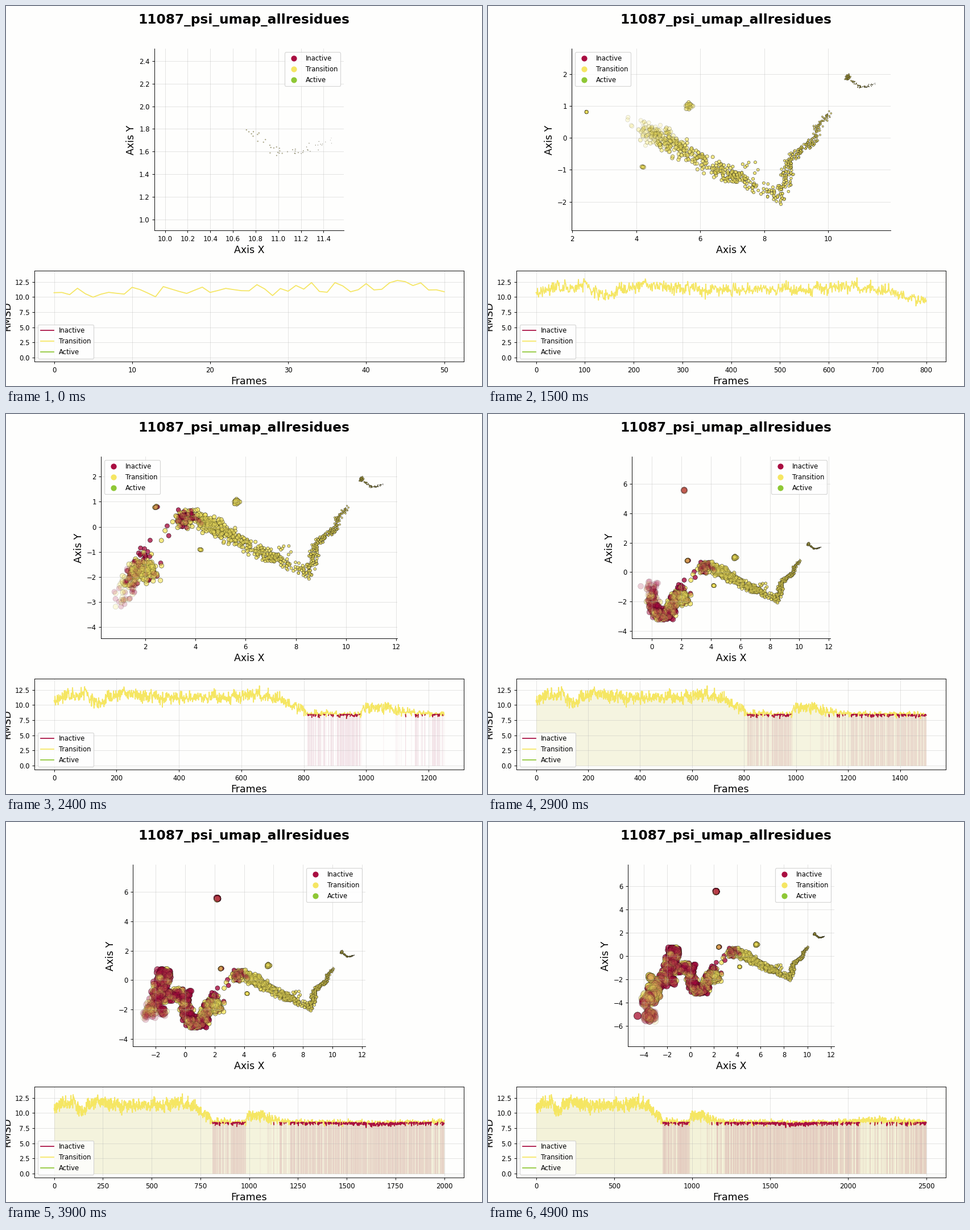
Write a matplotlib script that moves like this. It is 837x669 px and loops after 5000 ms.

```python
import numpy as np
import matplotlib.pyplot as plt
from matplotlib.animation import FuncAnimation
from matplotlib.colors import to_rgb
from matplotlib.lines import Line2D

WIDTH, HEIGHT, DPI = 837, 669, 83.7
STEP, STEPS = 50, 50
TOTAL = STEP * STEPS
RED, YELLOW, GREEN = "#a90e41", "#f5e663", "#8ec735"
STATES = {"Inactive": RED, "Transition": YELLOW, "Active": GREEN}
THRESHOLD = 8.5
LAYER_ALPHA = 0.2
MAP_HEIGHT = 320
LEGEND_SIZE = np.array([110, 62])

rng = np.random.default_rng(11087)
index = np.arange(TOTAL + 1)


def noise(count, limit=1.9):
    return rng.normal(size=count).clip(-limit, limit)


# RMSD level by simulation frame; noise grows with the level.
TREND = [(0, 11), (30, 11), (45, 12), (75, 10.9), (100, 12.4), (115, 10.7),
         (145, 10.3), (215, 12), (300, 11.2), (550, 11.2), (655, 11.7),
         (740, 10.6), (815, 8.6), (970, 8.35), (1005, 9.8), (1085, 9.4),
         (1160, 8.55), (1700, 8.25), (2000, 8.5), (2190, 8.75), (2500, 8.45)]
level = np.interp(index, *zip(*TREND))
slow = np.convolve(noise(index.size), np.ones(6) / 6, "same")
sigma = np.clip(.22 * (level - 7.4), .23, .5)
rmsd = level + sigma * (noise(index.size, 2.3) + slow)
rmsd = rmsd.clip(6.9, 13.65)
inactive = (index > 810) & (rmsd < THRESHOLD)

# Key places on the path through the embedding: index, x, y
PATH = [(0, 11.49, 1.7), (28, 11.05, 1.56), (46, 10.77, 1.78), (50, 10.58, 1.86),
        (90, 10.65, 1.96), (91, 10.05, .8), (120, 9.65, .36), (150, 9.62, -.06),
        (240, 8.8, -.65), (300, 8.65, -1.4), (335, 8.5, -1.9), (400, 7.3, -1.28),
        (500, 6.4, -.95), (580, 5.4, -.35), (800, 4.2, .3), (850, 3.5, .35),
        (905, 3.45, .25), (915, 2.1, -.9), (975, 1.5, -2.2), (985, 2.35, -1.8),
        (1150, 1.55, -1.7), (1260, 1.2, -2.85), (1360, .3, -2.8), (1420, 0, -2),
        (1500, 0, -1), (1640, -1.85, -1.1), (1650, -1.4, .25), (1800, -1.5, .3),
        (1920, -2.1, -1.8), (2080, -3.2, -2.7), (2260, -3.1, -3.5),
        (2400, -3.8, -3.7), (2420, -3.5, -5.1), (2500, -3.5, -5.1)]
# Points away from the path: index range, x, y, spread
STRAYS = [(range(48, 50), 10.02, .66, .06), (range(290, 660, 60), 2.45, .81, .015),
          (range(350, 400, 8), 7.6, -.87, .15), (range(560, 770, 9), 5.66, 1, .06),
          (range(610, 690, 13), 4.2, -.9, .04), (range(815, 905, 9), 2.44, .79, .03),
          (range(1400, 1720, 11), 2.2, 5.55, .03), (range(1785, 2000, 14), -1.5, -2.2, .14),
          (range(2060, 2240, 11), -3.4, -1.83, .08), (range(2430, 2496, 13), -4.53, -5.1, .015)]

path_n, path_x, path_y = zip(*PATH)
loose = index + np.minimum(25, .06 * index) * noise(index.size)
spread = .015 + .22 * (1 - np.exp(-index / 600))
px = np.interp(loose, path_n, path_x) + spread * noise(index.size)
py = np.interp(loose, path_n, path_y) + spread * noise(index.size)
for group, x, y, size in STRAYS:
    px[group] = x + size * noise(len(group))
    py[group] = y + size * noise(len(group))

face = np.ones((index.size, 4))
face[:, :3] = np.where(inactive[:, None], to_rgb(RED), to_rgb(YELLOW))

fig = plt.figure(figsize=((WIDTH + .01) / DPI, (HEIGHT + .01) / DPI), dpi=DPI,
                 facecolor="#fefefd")
fig.suptitle("11087_psi_umap_allresidues", fontsize=20, fontweight="bold")


def add_axes(left, top, right, bottom):
    return fig.add_axes([left / WIDTH, 1 - bottom / HEIGHT,
                         (right - left) / WIDTH, (bottom - top) / HEIGHT])


map_ax = add_axes(50.2, 75.5, 804.8, 75.5 + MAP_HEIGHT)
line_ax = add_axes(50.2, 466, 804.8, 626.5)


def prepare(ax, xlabel, ylabel):
    ax.clear()
    ax.set_facecolor("none")
    ax.set_xlabel(xlabel, fontsize=15)
    ax.set_ylabel(ylabel, fontsize=15)
    ax.grid(alpha=.35)


def add_legend(ax, loc, **style):
    handles = [Line2D([], [], color=c, label=name, **style) for name, c in STATES.items()]
    ax.legend(handles=handles, loc=loc)


def draw_points(n):
    """Every update paints all points again, so older ones grow more opaque."""
    shown = index[:n]
    age = (n - 1 - shown) // STEP + 1
    age[:STEP] += 2  # the opening batch is painted three times
    base, second = shown[age > 2], shown[age > 1]
    order = np.concatenate([base, second, shown])
    alpha = np.full(order.size, LAYER_ALPHA)
    alpha[:base.size] = np.minimum(.7, 1 - (1 - LAYER_ALPHA) ** (age[base] - 2))
    colors = face[order]
    colors[:, 3] = alpha
    edges = np.zeros_like(colors)
    edges[:, 3] = alpha
    map_ax.scatter(px[order], py[order], s=order / 20, c=colors,
                   edgecolors=edges, linewidths=.45)


def draw_map(n):
    prepare(map_ax, "Axis X", "Axis Y")
    map_ax.spines[["top", "right"]].set_visible(False)
    x, y = px[:n], py[:n]
    margin = .05 * np.ptp(x)
    right, top, bottom = x.max() + margin, 1.4 * y.max(), 1.4 * y.min()
    map_ax.set(xlim=(x.min() - margin, right), ylim=(bottom, top))
    map_ax.set_aspect("equal")
    draw_points(n)

    legend_w, legend_h = LEGEND_SIZE * (top - bottom) / MAP_HEIGHT
    covered = ((x > right - legend_w) & (y > top - legend_h)).any()
    add_legend(map_ax, "upper left" if covered else "upper right",
               linestyle="", marker="o", markersize=8.8, markeredgewidth=0)


def draw_curve(n):
    prepare(line_ax, "Frames", "RMSD")
    x, y, low = index[:n + 1], rmsd[:n + 1], inactive[:n + 1]
    if n >= 1400:
        line_ax.fill_between(x, 0, y, color="#dcd98c", linewidth=0, alpha=.15 + n / 15000)
    line_ax.fill_between(x, 0, y, where=low, color="#a8305a", linewidth=.4,
                         alpha=.1 + n / 50000)
    line_ax.plot(x, y, color=YELLOW, linewidth=1.5)
    line_ax.plot(x, np.where(low, y, np.nan), color=RED, linewidth=1.5)
    line_ax.set(xlim=(-.05 * n, 1.05 * n), ylim=(-.6825, 14.3325),
                yticks=np.arange(0, 13, 2.5))
    add_legend(line_ax, "lower left")


def update(frame):
    n = STEP * (frame + 1)
    draw_map(n)
    draw_curve(n)
    return []


animation = FuncAnimation(fig, update, frames=STEPS, interval=100, repeat=True,
                          repeat_delay=0, init_func=lambda: [])
plt.show()
```
